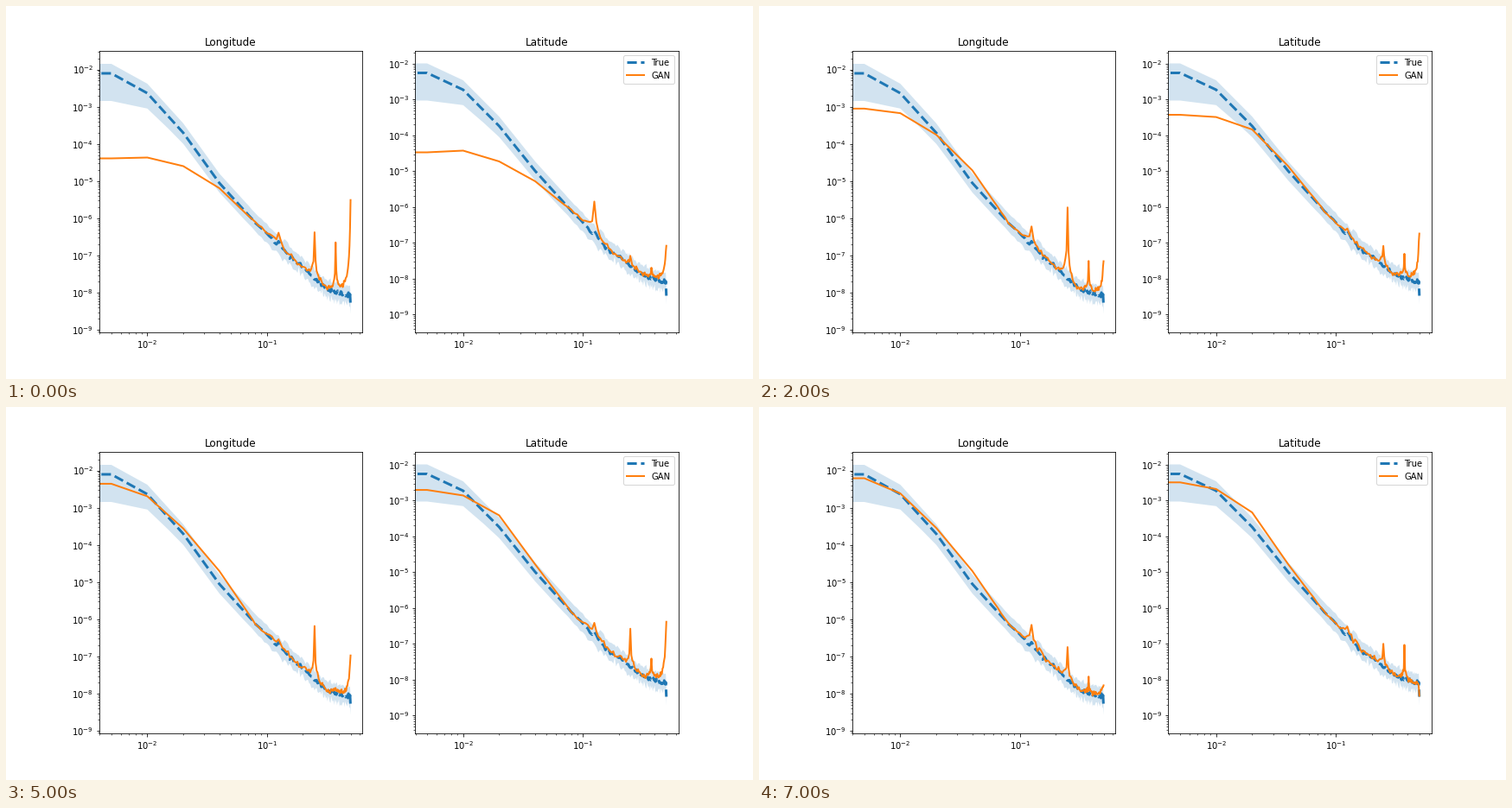
A matplotlib script for the animation above (8 s loop, 864 by 432 pixels).

```python
import numpy as np
import matplotlib.pyplot as plt
from matplotlib.animation import FuncAnimation

W, H, DPI = 864, 432, 72
TOP, BOTTOM = 0.12 * H, 0.875 * H  # axes edges, px from the top of the stage
BINS = np.arange(1, 101)
FREQ = np.arange(101) * 0.005
OCTAVES = [1, 2, 4, 8, 16, 32, 64, 99, 100]
SPIKES = [25, 50, 75, 100]
STEPS = [0, 1, 3, 5, 6, 7]  # steps with known spike heights


def along(knots, values):
    """Interpolate over log frequency."""
    return np.interp(np.log(BINS), np.log(knots), values)


def jitter(size, seed):
    """Seeded roughness that sets in with the dense tail."""
    noise = np.random.default_rng(seed).normal(0, size, BINS.size)
    return noise * np.clip((BINS - 12) / 12, 0, 1)


def spike(center):
    """Sharp peak on a broad foot; the one at the last bin is wider."""
    dist = np.abs(BINS - center) / (3 if center == 100 else 1)
    return 0.6 * np.exp(-2 * dist) + 0.4 * np.exp(-dist / 3)


class Panel:
    """Heights are px from the top of the stage, converted to powers of ten."""

    def __init__(self, ax, title, px_at_2, px_decade, base, start, rest, rate,
                 spikes):
        self.ax, self.px_at_2, self.px_decade = ax, px_at_2, px_decade
        self.base = along(OCTAVES, base)
        self.start, self.rest, self.rate = map(np.array, (start, rest, rate))
        self.spikes = spikes
        ax.set_title(title)
        ax.set_xscale("log")
        ax.set_yscale("log")
        ax.set_xlim(0.005 * 10 ** -0.1, 0.5 * 10 ** 0.1)
        ax.set_ylim(*self.power(np.array([BOTTOM, TOP])))

        mid = self.spectrum(self.base + jitter(1.6, 1))
        high = self.spectrum(self.base - 11 + jitter(1.5, 2))
        low = self.spectrum(self.base + 10 + 22 / BINS ** 1.5 + jitter(2.4, 3))
        ax.plot(FREQ, mid, "--", color="C0", lw=3, label="True")
        ax.fill_between(FREQ, low, high, color="C0", alpha=0.2, lw=0)
        self.line, = ax.plot(FREQ, mid, color="C1", lw=2, label="GAN")

    def power(self, y):
        return 10 ** (-2 - (y - self.px_at_2) / self.px_decade)

    def spectrum(self, y):
        return self.power(np.concatenate([y[:1], y]))

    def show(self, step):
        # The error at the lowest octaves decays exponentially with training.
        gap = self.rest + (self.start - self.rest) * np.exp(-self.rate * step)
        y = self.base + along(OCTAVES[:5], [*gap, 0]) + jitter(1.6, 10 + step)
        for center, rises in zip(SPIKES, self.spikes):
            y -= np.interp(step, STEPS, rises) * spike(center)
        self.line.set_ydata(self.spectrum(y))


fig, axes = plt.subplots(1, 2, figsize=(W / DPI, H / DPI), dpi=DPI)
fig.subplots_adjust(left=0.125, right=0.9, bottom=0.125, top=0.88, wspace=0.2)

lon = Panel(axes[0], "Longitude", 73.52, 43.09,
            base=[78, 101, 147, 205, 251, 291, 329, 336, 346],
            start=[98.5, 74.5, 38.5, 6], rest=[0, -2.5, -7, -15],
            rate=[0.44, 0.55, 0.8, 2],
            spikes=[[14, 20, 21, 10, 42, 25],
                    [53, 140, 26, 60, 38, 36],
                    [54, 22, 52, 6, 69, 16],
                    [123, 41, 59, 59, 87, 23]])
lat = Panel(axes[1], "Latitude", 66.9, 41.5,
            base=[77.5, 97, 139, 191, 237, 280, 312, 321, 335],
            start=[92, 70.5, 41, 12], rest=[0, -10, -19, -9],
            rate=[0.32, 0.33, 0.48, 0.9],
            spikes=[[38, 10, 2, 17, 49, 11],
                    [11, 19, 28, 42, 35, 25],
                    [10, 8, 49, 23, 86, 37],
                    [59, 50, 92, 87, 115, 0]])
lat.ax.legend(loc="upper right")


def update(step):
    for panel in (lon, lat):
        panel.show(step)
    return lon.line, lat.line


anim = FuncAnimation(fig, update, frames=8, interval=1000, repeat=True,
                     repeat_delay=0, init_func=lambda: update(0))
plt.show()
```
